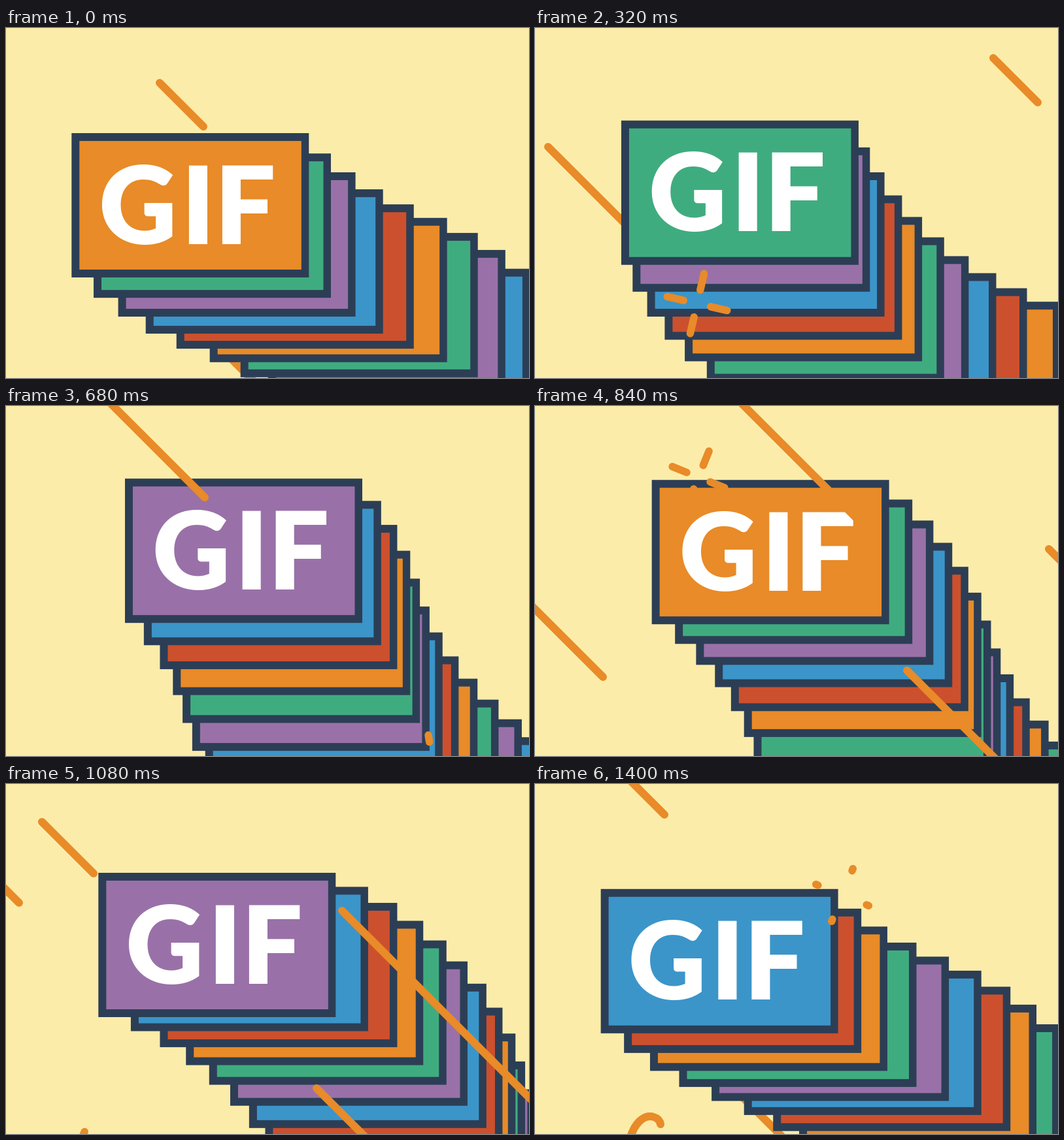
These frames come from a looping animation (800 by 536 pixels, 1.44 s). An HTML page with a canvas:

```html
<!DOCTYPE html>
<html lang="en">
<head>
<meta charset="utf-8">
<title>Card stack</title>
<style>
html, body { margin: 0; width: 100%; height: 100%; overflow: hidden; background: #fcecaa; }
canvas { display: block; }
</style>
</head>
<body>
<canvas id="stage" width="800" height="536"></canvas>
<script>
const ctx = document.getElementById('stage').getContext('2d');
const LOOP = 1440, STEP = 40, ECHO = 80;
const PAPER = '#fcecaa', INK = '#2c3e55', ORANGE = '#e88b28';
const COLORS = [ORANGE, '#3fac7f', '#9971a8', '#3b95c9', '#cc502e'];

// x - y, time, tail x, tail speed, head x, head speed, above the cards
const FAST = 2.6;
const STREAKS = [
  [151, 1440, 235, FAST, 302, FAST, true],
  [655, 320, 701, FAST, 769, FAST, false],
  [655, 1240, 635, FAST, 702, FAST, false],
  [-91, 520, 14, FAST, 81, FAST, false],
  [-311, 840, -6, FAST, 104, FAST, false],
  [567, 840, 786, FAST, 854, FAST, false],
  [164, 840, 569, FAST, 720, FAST, true],
  [9, 1080, 475, FAST, 554, FAST, true],
  [-3, 1080, 55, FAST, 134, FAST, false],
  [320, 1080, 514, 1.02, 1129, FAST, true],
  [-162, 1240, -20, 1.02, 276, 1.6, false],
  [-162, 320, 20, 0.885, 300, 1.6, false]
];

// centre, radius, turn in degrees, start
const BURSTS = [
  [248, 422, 47, 13, 190],
  [653, 548, 44.5, -9, 450],
  [250, 109, 43, 22, 710],
  [107, 565, 43, 22, 1040],
  [470, 170, 43.5, 22, 1110]
];

// centre, turn in degrees, start
const CURLS = [[595, 111, 0, 410], [185, 552, 180, 1290]];
const CURL = new Path2D('M-7 31C-5 42 10 47 21 39C34 30 42 9 41-6C40-31 22-43 6-41C-17-39-41-21-42-5C-42 10-25 10-16 4C-5-4 1-13 5-24');
const CURL_LENGTH = 258;

const clamp = v => Math.min(1, Math.max(0, v));

function ease(p) {
  const half = q => Math.pow(2 * q, 2.2) / 2;
  return p < 0.5 ? half(p) : 1 - half(1 - p);
}

function path(t) {
  const p = ((t % LOOP + LOOP) % LOOP) / (LOOP / 2);
  const e = ease(p < 1 ? p : 2 - p);
  return [100.3 + 82 * e, 161 - 50 * e];
}

function line(x1, y1, x2, y2) {
  ctx.beginPath();
  ctx.moveTo(x1, y1);
  ctx.lineTo(x2, y2);
  ctx.stroke();
}

function drawStreaks(t, above) {
  ctx.lineWidth = 12;
  for (const [c, ref, tail, tailSpeed, head, headSpeed, top] of STREAKS) {
    if (top !== above) continue;
    for (const now of [t, t + LOOP]) {
      const a = tail + (now - ref) * tailSpeed;
      const b = head + (now - ref) * headSpeed;
      if (b > a) line(a, a - c, b, b - c);
    }
  }
}

function drawBursts(t) {
  ctx.lineWidth = 11.5;
  for (const [x, y, radius, turn, start] of BURSTS) {
    const age = t - start;
    if (age <= 0 || age >= 325) continue;
    const outer = radius * (1 - (1 - clamp(age / 70)) ** 2);
    const inner = radius * (1 - (1 - age / 330) ** 1.2);
    for (let i = 0; i < 4; i++) {
      const a = (turn + 90 * i) * Math.PI / 180;
      const dx = Math.sin(a), dy = -Math.cos(a);
      line(x + dx * inner, y + dy * inner, x + dx * outer, y + dy * outer);
    }
  }
}

function drawCurls(t) {
  ctx.lineWidth = 12;
  for (const [x, y, turn, start] of CURLS) {
    const head = clamp((t - start) / 110);
    const tail = clamp((t - start - 110) / 100);
    if (head <= tail) continue;
    ctx.save();
    ctx.translate(x, y);
    ctx.rotate(turn * Math.PI / 180);
    ctx.setLineDash([(head - tail) * CURL_LENGTH, 1000]);
    ctx.lineDashOffset = -tail * CURL_LENGTH;
    ctx.stroke(CURL);
    ctx.restore();
  }
}

function drawCards(t) {
  const newest = Math.floor(t / ECHO);
  for (let k = 15; k >= 0; k--) {
    const [px, py] = path(t - k * ECHO);
    const x = px + 32.2 * k, y = py + 32.1 * k;
    ctx.fillStyle = INK;
    ctx.fillRect(x, y, 363, 221);
    ctx.fillStyle = COLORS[((k - newest) % 5 + 5) % 5];
    ctx.fillRect(x + 12, y + 12, 339.5, 197);
  }
  const [x, y] = path(t);
  ctx.fillStyle = '#fff';
  ctx.font = '900 165px Lato, sans-serif';
  [['G', 42], ['I', 168], ['F', 219]].forEach(([ch, dx]) => ctx.fillText(ch, x + dx, y + 169.5));
}

function draw(t) {
  ctx.fillStyle = PAPER;
  ctx.fillRect(0, 0, 800, 536);
  ctx.strokeStyle = ORANGE;
  ctx.lineCap = ctx.lineJoin = 'round';
  drawStreaks(t, false);
  drawCurls(t);
  drawCards(t);
  drawStreaks(t, true);
  drawBursts(t);
}

const begin = performance.now();
function tick() {
  const t = (performance.now() - begin) % LOOP;
  draw(Math.floor(t / STEP) * STEP);
  requestAnimationFrame(tick);
}
tick();
</script>
</body>
</html>
```
